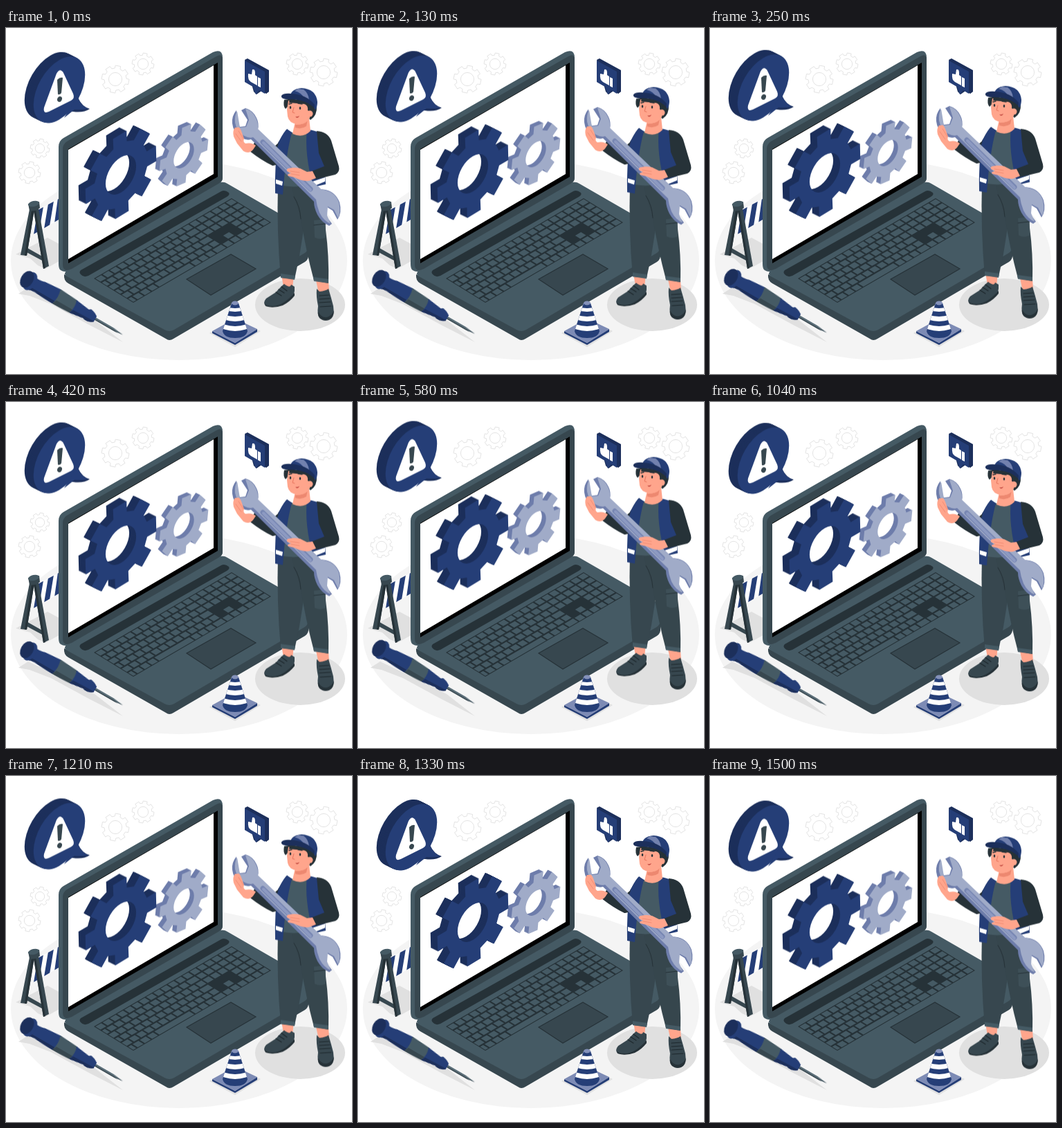
An HTML page for the animation above (1.54 s loop, 500x500 px).

```html
<!DOCTYPE html>
<html lang="en">
<head>
<meta charset="utf-8">
<title>Repair service</title>
<style>
html, body { margin: 0; width: 100%; height: 100%; overflow: hidden; background: #fff; }
svg { display: block; width: 100vw; height: 100vh; }
.float { animation: float 1540ms linear infinite; }
@keyframes float {
  0%, 100% { transform: translateY(0); }
  45.78% { transform: translateY(-9.16px); }
  95.78% { transform: translateY(.84px); }
}
.blue { fill: #253e77; }
.navy { fill: #1c2f5b; }
.pale { fill: #a0abc8; }
.mid { fill: #6e7dab; }
.slate { fill: #455a64; }
.dark { fill: #37474f; }
.ink { fill: #263238; }
.skin { fill: #ffa58c; }
.white { fill: #fff; }
.shade { fill: #e0e0e0; }
.line { fill: none; stroke-linecap: round; stroke-linejoin: round; }
</style>
</head>
<body>
<svg viewBox="0 0 500 500">
  <defs>
    <clipPath id="coneClip"><path d="M326 398Q331 392 336 398L349 438Q347 448 331 448Q315 448 313 438Z"/></clipPath>
    <clipPath id="boardClip"><path d="M35 269L76 247V277L40 298Z"/></clipPath>
  </defs>

  <ellipse cx="250" cy="336" rx="243" ry="144" fill="#f4f4f4"/>
  <g id="outlines" fill="none" stroke="#e0e0e0" stroke-width=".9"/>

  <!-- floor shadows -->
  <path class="shade" d="M14 327L60 303 84 316V333L57 348 46 343 35 333Z"/>
  <path class="shade" d="M18 384L32 375 80 398 128 422 169 454 122 430 65 399 34 387Z"/>
  <ellipse class="shade" cx="425" cy="400" rx="65" ry="38"/>
  <path class="shade" d="M294 441L331 419 368 438 331 461Z"/>

  <!-- barrier -->
  <g>
    <path class="white" d="M35 269L76 247V277L40 298Z"/>
    <g class="blue" clip-path="url(#boardClip)">
      <path d="M46 262L54 258 48 294 40 298ZM61 254L69 250 63 286 55 290ZM75 246L82 242 78 278 70 282Z"/>
    </g>
    <path class="dark" d="M24 314L54 331V337L24 321Z"/>
    <path class="dark" d="M34 262L41 262 30 329 21 328Z"/>
    <path class="ink" d="M37 262L41 262 30 329 27 329Z"/>
    <path class="dark" d="M40 264L47 261 62 344 54 348Z"/>
    <path class="ink" d="M40 264L43 263 57 347 54 348Z"/>
    <path class="dark" d="M32 254L48 251 49 260Q42 266 34 264Z"/>
    <ellipse class="slate" cx="40" cy="254" rx="8" ry="4" transform="rotate(-14 40 254)"/>
  </g>

  <!-- laptop base -->
  <path class="dark" d="M84 356Q83 365 90 369L231 449Q236 453 242 449L432 338Q438 334 437 326V296L236 430Z"/>
  <path class="slate" d="M88 350L308 224Q314 221 320 225L431 289Q437 293 437 300V316Q437 321 432 325L243 436Q236 440 229 436L88 359Q82 355 88 350Z"/>
  <path class="ink" d="M108 350L311 236Q316 233 322 238 324 241 319 244L119 358Q112 361 108 356 105 353 108 350Z"/>
  <g transform="matrix(199 -116 57 35 127 362)">
    <path class="ink" d="M0 0H1V1H0Z"/>
    <path id="keys" class="slate"/>
  </g>
  <path class="dark" d="M261 363L325 327 361 348 296 386Z" stroke="#263238" stroke-width="1.2"/>

  <!-- laptop lid -->
  <path class="slate" d="M76 172Q76 163 83 159L299 35Q313 29 313 43V216Q313 222 308 225L92 350Q85 354 79 350 76 348 76 341Z"/>
  <path class="dark" d="M82 175Q82 168 88 164L304 41Q313 36 313 46V216Q313 222 307 225L95 348Q83 354 82 343Z"/>
  <path d="M90 175L306 50V215L90 340Z" fill="#000"/>
  <path class="white" d="M90 176L300 54V211L90 334Z"/>

  <g class="float">
    <g id="smallGear"/>
    <g id="bigGear"/>
  </g>

  <!-- alert bubble -->
  <g class="float">
    <g id="bubble"/>
    <path class="navy" d="M90 121L104 101Q110 114 121 117 112 123 97 121Z"/>
    <path class="blue" d="M84 130L103 98Q107 112 119 117 109 119 99 118Z"/>
    <path class="white" d="M73 66Q78 57 83 65L97 95Q100 102 94 105L62 121Q53 125 55 115Z"/>
    <path class="dark" d="M74 75Q78 71 82 72L80 94Q78 97 75 96Z"/>
    <ellipse class="dark" cx="77.500" cy="103" rx="3.300" ry="4" transform="rotate(25 77.500 103)"/>
  </g>

  <!-- approval sign -->
  <path class="navy" d="M345 46L349 44 380 61V92L376 95 369 91 362 96 358 92Z"/>
  <path class="blue" d="M345 47L374 63V95L366 90 361 96 357 85 345 78Z"/>
  <path class="white" d="M350 66L355 67 356 60Q360 59 360 65V68L363 70V83L354 78Q349 75 350 66ZM364 71L368 73V86L364 84Z"/>

  <!-- cone -->
  <g>
    <path class="blue" d="M298 438L331 455 363 435V439L331 458 298 441Z"/>
    <path d="M298 438L331 420 363 435 331 455Z" fill="#7d8bb5"/>
    <g id="cone" clip-path="url(#coneClip)"/>
    <ellipse cx="331" cy="397.500" rx="5" ry="3" fill="#8491b9"/>
  </g>

  <!-- screwdriver -->
  <g class="float">
    <g transform="translate(33 365) rotate(30)">
      <path d="M108-2H140L157 0 143 2H108Z" fill="#5c6f79"/>
      <path class="dark" d="M108 .5H148L157 0 143 2H108Z"/>
      <path class="blue" d="M5-9Q14-7 22-10L48-12V12L22 11Q14 9 6 12Z"/>
      <path class="navy" d="M8 7L48 7V12L22 11Q14 9 6 12Z"/>
      <path class="slate" d="M46-12L76-10V11L46 12Q50 0 46-12Z"/>
      <path class="dark" d="M49 5H78L76 11 46 12Z"/>
      <path class="blue" d="M74-10L96-7 99-9Q106-8 111-4V5Q106 9 99 9L95 8 74 11Q78 0 74-10Z"/>
      <path class="navy" d="M77 5L111 4V5Q106 9 99 9L95 8 74 11Z"/>
      <ellipse class="blue" cx="2" cy="0" rx="9" ry="14"/>
      <ellipse class="navy" cx="-3" cy="0" rx="9" ry="13"/>
    </g>
  </g>

  <!-- technician -->
  <g class="float">
    <path class="skin" d="M398 357H416L414 376 402 380ZM448 365H466L467 382 452 384Z"/>
    <path class="dark" d="M402 370Q397 374 390 382L376 391Q370 398 376 402 386 405 399 400L411 392Q418 386 417 374L412 371Q411 377 402 370Z"/>
    <path class="ink" d="M373 396Q374 402 386 402 400 402 417 383L417 387Q410 396 400 401 386 406 375 402Z"/>
    <path class="dark" d="M449 377L453 381Q462 380 466 377 470 390 473 402 475 415 469 420 462 424 454 420 449 415 451 402 448 388 449 377Z"/>
    <path class="ink" d="M451 410Q456 420 464 418 471 416 474 408 474 419 467 422 459 425 453 419 450 415 451 410Z"/>
    <path class="line" d="M390 382L398 387M394 378L402 383M398 374L406 380M453 387L467 386M453 392L468 391M453 397L469 396M454 403L470 402" stroke="#1e282d" stroke-width="1.200"/>

    <path class="dark" d="M393 225L435 230Q432 300 417 363L397 361Q391 295 393 225Z"/>
    <path d="M413 231L448 224Q462 258 462 292 467 330 466 369L445 365Q433 320 426 276Z" fill="#36464d"/>
    <path class="slate" d="M397 355L418 358 417 364 397 361ZM444 360L466 363V369L445 366Z"/>
    <path class="slate" d="M445 278L462 276V303Q454 307 446 303Z" opacity=".5"/>
    <path class="line" d="M445 285L462 283M426 276Q425 258 416 244" stroke="#263238" stroke-width="1"/>

    <path class="slate" d="M410 150Q425 156 440 148L457 217Q429 235 395 227Z"/>
    <path class="blue" d="M406 146L413 151Q404 185 400 241L389 239Q388 200 393 166Z"/>
    <path class="blue" d="M435 147Q450 147 457 157L462 226 444 230Q431 182 435 147Z"/>
    <path class="white" d="M390 219L400 222 399 228 390 225ZM443 222L461 216V222L444 229Z"/>

    <!-- rear arm -->
    <path class="ink" d="M394 166Q399 153 407 149L402 184Q394 200 385 199 370 192 352 178L360 164 381 177Z"/>
    <path class="blue" d="M405 147L413 151Q406 172 403 195L389 194Q390 165 405 147Z"/>

    <!-- head -->
    <path class="skin" d="M418 135L438 130 440 149Q429 160 414 153Z"/>
    <path d="M418 140Q429 141 436 133L434 142Q427 147 418 144Z" fill="#ed8870"/>
    <path class="ink" d="M434 107L449 112Q450 127 440 133L434 127ZM402 104L414 102 408 113 404 117Q400 113 402 104Z"/>
    <path class="skin" d="M408 105L440 108 439 130Q433 141 421 139 409 138 407 128L406 118Z"/>
    <path class="ink" d="M410 102L445 107 448 117 439 122 436 119Q437 112 431 110L409 108Z"/>
    <circle class="skin" cx="439" cy="124" r="4.500"/>
    <path class="line" d="M409 110L413 109M422 109L428 110" stroke="#263238" stroke-width="1.400"/>
    <ellipse class="ink" cx="411" cy="115" rx="1.300" ry="1.900"/>
    <ellipse class="ink" cx="425" cy="116" rx="1.300" ry="1.900"/>
    <path class="line" d="M416 115L414 122 417 123" stroke="#e8765f" stroke-width="1"/>
    <path d="M418 128Q421 129 424 127 423 130 420 130Z" fill="#c64f45"/>
    <path class="blue" d="M410 101Q411 88 427 87 448 88 450 107 450 114 447 119 443 108 431 105Z"/>
    <path d="M417 91L422 88 430 89Q437 94 438 104L431 102Q428 94 417 91Z" fill="#7281ae"/>
    <path class="navy" d="M398 98Q401 94 412 95 434 96 446 111L446 116Q432 102 404 103 397 102 398 98Z"/>

    <!-- wrench -->
    <g>
      <path class="mid" d="M333 119Q326 127 327 138 328 151 341 159 348 163 354 161L445 251Q445 260 450 270 456 281 467 286L471 283 462 271 464 259 472 264 479 277Q486 267 482 252 476 237 462 234L455 233 364 147Q366 138 362 130 357 119 346 116L340 119 349 133 346 142 338 143 333 133Z"/>
      <path class="pale" d="M334 120Q330 127 331 137 333 149 344 156 352 160 357 158L448 248Q449 257 453 267 459 279 469 283L464 271 465 258 474 263 480 275Q484 266 481 252 476 238 463 235L455 233 364 146Q365 138 361 130 356 119 346 117L351 133 347 143 338 144Z"/>
      <path class="line" d="M371 165L440 233" stroke="#7786b2" stroke-width="7"/>
      <path class="line" d="M372 166L440 234" stroke="#8d9ac2" stroke-width="4"/>
    </g>

    <path class="skin" d="M331 144Q327 149 329 157L334 167 343 178Q351 183 357 176L361 170Q355 165 346 167 342 165 344 160L340 149Q337 142 334 144Z"/>
    <path class="line" d="M332 153L340 164M336 149L343 160" stroke="#ed8870" stroke-width=".8"/>

    <!-- front arm -->
    <path class="ink" d="M449 149Q465 150 470 163L481 200Q483 208 476 212L447 219 442 207 460 200 452 181Z"/>
    <path class="skin" d="M409 203Q416 201 425 203L435 208 443 207 448 217 438 221Q427 222 417 216L408 214Q405 211 412 210L406 207Q405 203 409 203Z"/>
    <path class="line" d="M411 207L424 209M412 211L424 213" stroke="#ed8870" stroke-width=".8"/>
  </g>
</svg>
<script>
const $ = id => document.getElementById(id);

const NS = "http://www.w3.org/2000/svg";
function add(parent, tag, attrs) {
  const el = document.createElementNS(NS, tag);
  for (const k in attrs) el.setAttribute(k, attrs[k]);
  parent.append(el);
}

// Gear around the origin: tapered teeth plus a round hole.
function gearPath(R, root, hole, turn = 0, teeth = 8) {
  const pts = [];
  for (let i = 0; i < teeth; i++) {
    const a = turn + i * 2 * Math.PI / teeth;
    for (const [d, r] of [[-.25, root], [-.19, R], [.19, R], [.25, root]])
      pts.push((r * Math.cos(a + d)).toFixed(2) + " " + (r * Math.sin(a + d)).toFixed(2));
  }
  return `M${pts.join("L")}Z` + circlePath(hole);
}

function circlePath(r) {
  return `M${r} 0A${r} ${r} 0 1 0 ${-r} 0A${r} ${r} 0 1 0 ${r} 0Z`;
}

// Stacks copies of a shape along the isometric depth axis.
function extrude(id, d, x, y, depth, side, face) {
  for (let k = depth; k >= 0; k--)
    add($(id), "path", {
      d, class: k ? side : face, "fill-rule": "evenodd",
      transform: `matrix(.866 -.5 0 1 ${x - k} ${y - k * .5})`
    });
}

extrude("bigGear", gearPath(60, 45, 25.5, -.03), 166, 212.5, 10, "navy", "blue");
extrude("smallGear", gearPath(41, 31, 17, .12), 257, 184, 6, "mid", "pale");
extrude("bubble", circlePath(43), 77, 89.5, 13, "navy", "blue");

for (const [x, y, R] of [[158, 74, 20], [198, 52, 16], [421, 52, 16], [459, 64, 20], [49, 174, 14], [34, 209, 16]])
  add($("outlines"), "path", {
    d: gearPath(R, R * .8, R * .48, .2), transform: `translate(${x} ${y})`
  });

// Keyboard laid out on a unit square, letter rows staggered.
let keys = "";
for (let r = 0; r < 6; r++) {
  const shift = r % 2 * .4;
  for (let c = 0; c < 19; c++) {
    const arrowGap = c > 12 && c < 16 && (r === 3 || r === 4 && c !== 14);
    const underSpace = r === 5 && c > 4 && c < 9;
    if (arrowGap || underSpace) continue;
    const x = c && c < 13 ? c - shift : c;
    let w = r === 5 && c === 4 ? 5 : 1;
    if (c === 0) w -= shift;
    if (c === 12) w += shift;
    keys += `M${(x + .1) / 19} ${(r + .12) / 6}h${(w - .2) / 19}v${.77 / 6}h${-(w - .2) / 19}Z`;
  }
}
$("keys").setAttribute("d", keys);

// Cone bands, painted from the foot up.
for (const [i, y] of [449, 438, 431, 424, 417, 410, 405].entries())
  add($("cone"), "ellipse", {
    cx: 331, cy: y - 32, rx: 40, ry: 32, class: i % 2 ? "white" : "blue"
  });
</script>
</body>
</html>
```
